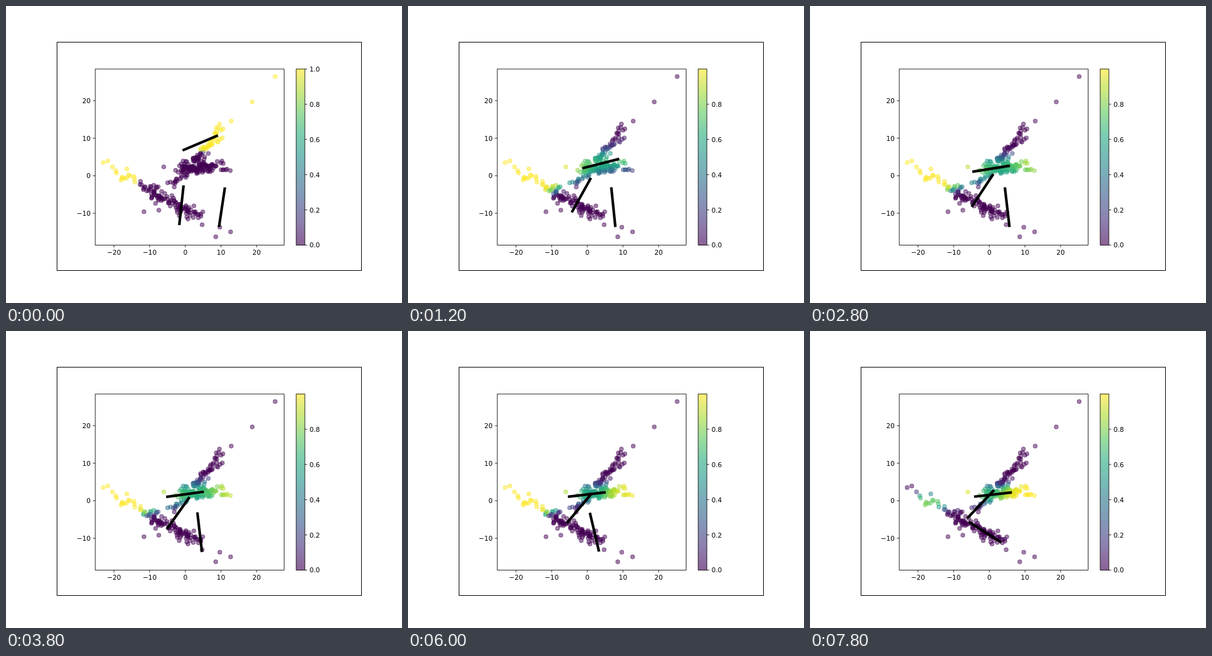
Animation of 640 by 480 pixels, one loop 8 s. Source, as an HTML page with a canvas:

```html
<!DOCTYPE html>
<html lang="en">
<head>
<meta charset="utf-8">
<title>Mixture of three lines</title>
<style>
html, body { margin: 0; width: 100%; height: 100%; overflow: hidden; background: #fff; }
canvas { display: block; }
</style>
</head>
<body>
<canvas id="stage" width="640" height="480"></canvas>
<script>
const ctx = document.getElementById('stage').getContext('2d');
const STEP = 200, STEPS = 40;
const BOX = { x: 144.2, y: 101.9, w: 305.3, h: 284.5 };
const BAR = { x: 469, y: 101.9, w: 14, h: 284.5 };
const SX = 5.762, SY = 6.063, X0 = 289.8, Y0 = 274.3;  // data units to pixels
const HALF = 5.33;                                     // half a line, in data units

let seed = 11;
const rand = () => (seed = (seed * 16807) % 2147483647) / 2147483647;
const gauss = () => (rand() + rand() + rand() + rand() + rand() + rand() - 3) * 1.41;

// lone points, then clouds strewn along straight stretches
const points = [
  [435, 114], [398, 155], [364, 186], [157, 253], [164.5, 250.5], [255, 260],
  [223, 332.5], [247, 330], [339, 373], [363, 365], [345.5, 357.5], [317, 353.5]
];
function strew(n, x1, y1, x2, y2, spread) {
  for (let i = 0; i < n; i++) {
    const u = (i + rand()) / n;
    points.push([x1 + (x2 - x1) * u + gauss() * spread, y1 + (y2 - y1) * u + gauss() * spread]);
  }
}
strew(14, 175, 265, 211, 280, 5);
strew(9, 336, 206, 348, 195, 3.5);
strew(9, 326, 218, 350, 215, 3);
strew(18, 315, 237, 332, 220, 3.5);
strew(24, 303, 251, 317, 241, 4);
strew(26, 302, 262, 267, 289, 4.5);
strew(85, 280, 263, 337, 260, 5);
strew(20, 295, 264, 325, 262, 4);
strew(9, 350, 258, 358, 262, 4);
strew(10, 216, 289, 234, 298, 3.5);
strew(36, 234, 298, 257, 311, 6);
strew(18, 256, 311, 276, 322, 6);
strew(30, 274, 323, 297, 331, 4.5);
strew(14, 299, 340, 315, 335, 4);

const VIRIDIS = ['440154', '472d7b', '3b528b', '2c728e', '21918c', '28ae80', '5ec962', 'addc30', 'fde725']
  .map(h => [0, 2, 4].map(i => parseInt(h.slice(i, i + 2), 16)));

function viridis(v, alpha) {
  const p = Math.min(Math.max(v, 0), 1) * 8, i = Math.min(7, Math.floor(p));
  const rgb = VIRIDIS[i].map((c, k) => Math.round(c + (VIRIDIS[i + 1][k] - c) * (p - i)));
  return `rgba(${rgb},${alpha})`;
}

const sigmoid = z => 1 / (1 + Math.exp(-z));
const decay = (t, rate) => Math.exp(-t / rate);

// centre in pixels, angle in degrees, spread in data units, weight
function linesAt(t) {
  const swing = sigmoid((t - 31.5) / .8), late = sigmoid((t - 37) / 1.2);
  return [
    {
      x: 289 + 25 * sigmoid((10.5 - t) / 2) + 8 * late,
      y: 264.3 - 43 * decay(t, 4),
      angle: 6 + 16 * decay(t, 8),
      spread: 1.7 - .012 * t, weight: 1.4
    },
    {
      x: 280.5 - .12 * t + 3 * decay(t, 3),
      y: 308 - .72 * t + 14 * decay(t, 3),
      angle: 61 - .41 * t + 22.5 * decay(t, 2),
      spread: 3.5 - 1.6 * sigmoid((t - 23) / 2), weight: 1
    },
    {
      x: 325 - .75 * t + 24 * decay(t, 8) - 13 * swing,
      y: 325.2,
      angle: 97 - 16 * decay(t, 2) + 52 * swing,
      spread: 5 - 3.5 * late, weight: 1
    }
  ];
}

// the first colouring is a rough split; later ones weigh the distances to the previous lines
function firstShare([px, py]) {
  const x = (px - X0) / SX, y = (Y0 - py) / SY;
  return Math.max(sigmoid(6 * (y - 6.5)), sigmoid(8 * (-13.6 - x)));
}

function share([px, py], lines) {
  const odds = lines.map(l => {
    const a = l.angle * Math.PI / 180;
    const d = Math.cos(a) * (l.y - py) / SY - Math.sin(a) * (px - l.x) / SX;
    return l.weight * Math.exp(-d * d / (2 * l.spread ** 2)) / l.spread;
  });
  return odds[0] / (odds[0] + odds[1] + odds[2] + 1e-99);
}

function segment(x1, y1, x2, y2) {
  ctx.beginPath();
  ctx.moveTo(x1, y1);
  ctx.lineTo(x2, y2);
  ctx.stroke();
}

function drawLine({ x, y, angle }) {
  const a = angle * Math.PI / 180;
  const dx = Math.cos(a) * HALF * SX, dy = Math.sin(a) * HALF * SY;
  segment(x - dx, y + dy, x + dx, y - dy);
}

function drawPoint([x, y], color) {
  ctx.fillStyle = ctx.strokeStyle = color;
  ctx.beginPath();
  ctx.arc(x, y, 3.2, 0, 2 * Math.PI);
  ctx.fill();
  ctx.stroke();
}

function drawBar() {
  for (let i = 0; i < 285; i++) {
    ctx.fillStyle = viridis(1 - i / 284, i % 2 ? .64 : .86);
    ctx.fillRect(BAR.x, 101.5 + i, BAR.w, 1);
  }
}

function label(text, x, y, align) {
  ctx.textAlign = align;
  ctx.fillText(String(text).replace('-', '\u2212'), x, y);
}

function drawFrame(topLabel) {
  ctx.strokeStyle = ctx.fillStyle = '#000';
  ctx.lineWidth = 1;
  ctx.strokeRect(82.5, 58.5, 492, 369);
  ctx.lineWidth = .85;
  for (const r of [BOX, BAR]) ctx.strokeRect(r.x, r.y, r.w, r.h);
  ctx.font = '10.69px "DejaVu Sans", sans-serif';
  const bottom = BOX.y + BOX.h, right = BAR.x + BAR.w;
  for (let v = -20; v <= 20; v += 10) {
    const x = X0 + v * SX, y = Y0 - v * SY;
    segment(x, bottom, x, bottom + 3.7);
    label(v, x, 402.4, 'center');
    if (v > -20) {
      segment(BOX.x - 3.7, y, BOX.x, y);
      label(v, 136.8, y + 4, 'right');
    }
  }
  for (let i = 0; i <= topLabel; i++) {
    const y = bottom - i / 5 * BAR.h;
    segment(right, y, right + 3.7, y);
    label((i / 5).toFixed(1), 490.4, y + 4, 'left');
  }
}

function draw(step) {
  const previous = linesAt(step - 1);
  ctx.fillStyle = '#fff';
  ctx.fillRect(0, 0, 640, 480);
  drawBar();
  ctx.lineWidth = 1.07;
  for (const p of points) drawPoint(p, viridis(step ? share(p, previous) : firstShare(p), .5));
  ctx.strokeStyle = '#000';
  ctx.lineWidth = 4.2;
  linesAt(step).forEach(drawLine);
  drawFrame(step ? 4 : 5);
}

const start = performance.now();
let shown = -1;
function tick() {
  const step = Math.floor((performance.now() - start) / STEP) % STEPS;
  if (step !== shown) draw(shown = step);
  requestAnimationFrame(tick);
}
tick();
</script>
</body>
</html>
```
